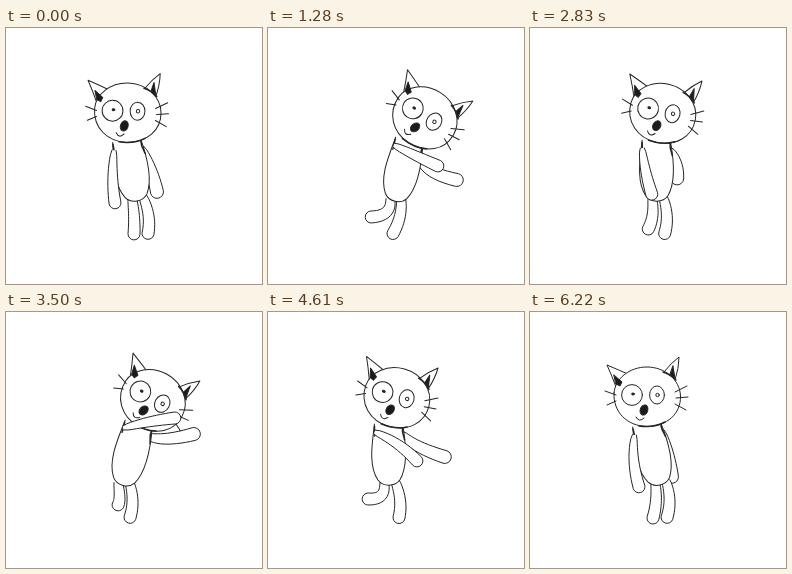
Animation, 256 px wide and 256 px high, one loop 6.27 s. Source, as an HTML page:

```html
<!DOCTYPE html>
<html lang="en">
<head>
<meta charset="utf-8">
<title>Dancing cat</title>
<style>
html, body { margin: 0; width: 100%; height: 100%; overflow: hidden; background: #fff; }
svg { display: block; width: 100vw; height: 100vh; }
path, ellipse, circle { fill: #fff; stroke: #252525; stroke-width: 1; stroke-linecap: round; stroke-linejoin: round; }
.line { fill: none; }
.ink { fill: #1b1b1b; }
.bold { stroke-width: 1.5; }
</style>
</head>
<body>
<svg viewBox="0 0 256 256">
  <path id="rightArm"/>
  <path id="rightLeg"/>
  <path id="leftLeg"/>
  <g id="body">
    <path d="M-14-3C-16 14-21 38-11 53C-6 60 6 60 11 53C20 38 17 14 14-3"/>
    <path class="line bold" d="M14-1L14 5L16 13M-14-1L-14 9"/>
  </g>
  <g id="head">
    <path d="M-31-10Q-35-21-40-32Q-28-27-17-22M17-25Q24-34 32-40Q32-29 28-17"/>
    <path d="M-33-4C-32-18-18-30 0-30C18-30 33-17 33.5-1C34 17 20 29 0 29.5C-20 29-34 15-33-4Z"/>
    <path class="ink" d="M-33-22L-25-15L-27-11L-31-13ZM26-31L28-18L23-22Z"/>
    <path class="line bold" d="M16-25Q23-23 29-17M-8 29Q7 31 18 25"/>
    <circle cx="-15" cy="-2" r="10.4"/>
    <ellipse cx="10" cy="-2" rx="7.4" ry="9"/>
    <ellipse class="ink" cx="-14" cy="-3" rx="1.4" ry="1"/>
    <circle cx="10.5" cy="-2" r="1.7"/>
    <ellipse class="ink" cx="-3" cy="13" rx="3.8" ry="5.2" transform="rotate(18 -3 13)"/>
    <path class="line" d="M-11 20Q-8 26-3 21M-42-6L-31-2M-40 8L-31 4M28-5L40-11M29 1L41 0M28 7L39 13"/>
  </g>
  <path id="leftArm"/>
</svg>
<script>
const LOOP = 6270, FPS = 18;

// head x, y, tilt | hip x | left elbow, hand | right elbow, hand | left foot | right foot x
const poses = {
  start:  [121.5, 85, 1,  131, 105, 150, 109, 175, 146, 140, 151, 164, 128, 206, 142],
  droop:  [156.5, 90, 32, 127, 148, 128, 170, 138, 152, 144, 189, 152, 103, 189, 125],
  fold:   [128, 85, 9.5,  125, 85, 150, 127, 149, 140, 145, 149, 151, 105, 197, 137],
  reach:  [146.5, 88.5, 29, 117, 142, 109, 169, 106, 158, 130, 188, 122, 112, 193, 124],
  swing:  [128.5, 86, 15.5, 121, 130, 129, 149, 149, 145, 135, 177, 145, 100, 187, 131],
  hang:   [126.5, 84.5, 7, 127, 106, 146, 110, 173, 148, 132, 137, 150, 122, 204, 137],
  left:   [117, 85, 0,    130, 101, 148, 109, 175, 139, 140, 142, 165, 123, 206, 137],
  throw:  [164, 92, 37,   126, 160, 118, 188, 116, 176, 138, 212, 132, 110, 196, 125]
};
const keys = [
  [0, "start"], [.17, "left"], [.5, "reach"], [.83, "fold"], [1.17, "throw"],
  [1.278, "droop"], [1.55, "swing"], [1.87, "throw"], [2.167, "fold"], [2.55, "droop"],
  [2.95, "hang"], [3.5, "reach"], [3.89, "hang"], [4.25, "reach"], [4.611, "swing"],
  [4.95, "reach"], [5.389, "hang"], [6.06, "left"], [6.222, "left"]
];

const $ = id => document.getElementById(id);
const deg = 180 / Math.PI;
const fix = v => v.toFixed(2);

function poseAt(t) {
  let i = 0;
  while (i < keys.length - 2 && t >= keys[i + 1][0]) i++;
  const [t0, a] = keys[i], [t1, b] = keys[i + 1];
  const u = Math.min(1, (t - t0) / (t1 - t0));
  const ease = (1 - Math.cos(Math.PI * u)) / 2;
  return poses[a].map((v, n) => v + (poses[b][n] - v) * ease);
}

function rotate(x, y, angle) {
  const c = Math.cos(angle), s = Math.sin(angle);
  return [x * c - y * s, x * s + y * c];
}

// Tapered limb along a quadratic curve, with a rounded end.
function limb(id, from, bend, to, r0, r1) {
  const near = [], far = [], steps = 12;
  for (let i = 0; i <= steps; i++) {
    const u = i / steps, v = 1 - u;
    const at = k => v * v * from[k] + 2 * u * v * bend[k] + u * u * to[k];
    const slope = k => v * (bend[k] - from[k]) + u * (to[k] - bend[k]);
    const dx = slope(0), dy = slope(1), len = Math.hypot(dx, dy) || 1;
    const r = r0 + (r1 - r0) * Math.sqrt(u);
    const nx = -dy / len * r, ny = dx / len * r;
    near.push(fix(at(0) + nx) + " " + fix(at(1) + ny));
    far.unshift(fix(at(0) - nx) + " " + fix(at(1) - ny));
  }
  $(id).setAttribute("d", `M${near.join("L")}A${r1} ${r1} 0 0 0 ${far.join("L")}`);
}

function place(id, x, y, angle, stretch = 1) {
  $(id).setAttribute("transform",
    `translate(${fix(x)} ${fix(y)}) rotate(${fix(angle * deg)}) scale(1 ${fix(stretch)})`);
}

function draw(t) {
  const [hx, hy, tilt, hip, lex, ley, lhx, lhy, rex, rey, rhx, rhy, lfx, lfy, rfx] = poseAt(t);
  const turn = tilt / deg;
  const [ox, oy] = rotate(0, 30, turn);
  const nx = hx + ox, ny = hy + oy, hipY = 173;
  const lean = Math.atan2(nx - hip, hipY - ny);
  const joint = (x, y) => {
    const [dx, dy] = rotate(x, y, lean);
    return [nx + dx, ny + dy];
  };
  place("head", hx, hy, turn);
  place("body", nx, ny, lean, Math.hypot(nx - hip, hipY - ny) / 58);
  limb("leftArm", joint(-14, 5), [lex, ley], [lhx, lhy], 2, 6);
  limb("rightArm", joint(13, 7), [rex, rey], [rhx, rhy], 3, 6.5);
  limb("leftLeg", [hip - 5, 170], [hip - 2, 188], [lfx, lfy], 4, 6);
  limb("rightLeg", [hip + 6, 169], [(hip + rfx) / 2 + 9, 188], [rfx, 205.5], 4, 6);
}

const start = performance.now();
function tick() {
  const ms = (performance.now() - start) % LOOP;
  draw(Math.floor((ms + 5) * FPS / 1000) / FPS);
  requestAnimationFrame(tick);
}
tick();
</script>
</body>
</html>
```
